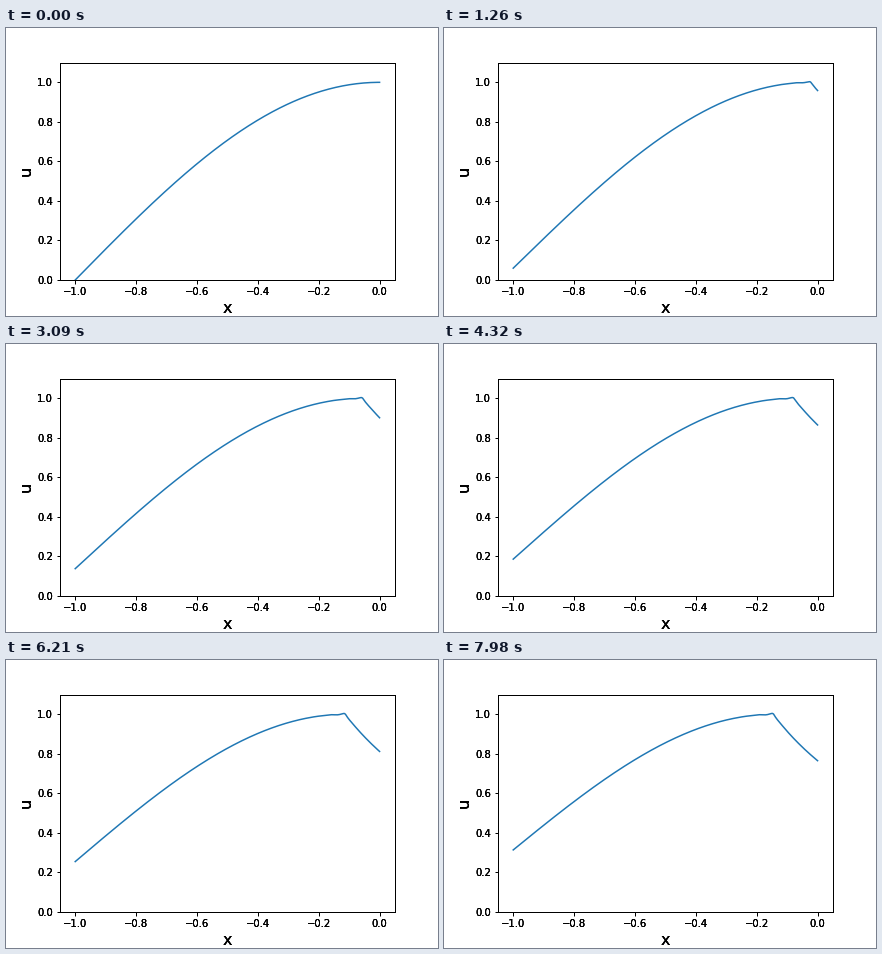
Animation, 432 px wide and 288 px high, one loop 8000 ms. Source, as a matplotlib script:

```python
import matplotlib.pyplot as plt
import numpy as np
from matplotlib.animation import FuncAnimation
from matplotlib.transforms import IdentityTransform

LOOP = 8000      # ms
STEP = 30        # ms per simulation step
FRAMES = 267
SPEED = 0.0317   # wave speed at u = 0, per second
DECAY = 0.0335   # decay rate of the inflow value at x = 0

plt.rcParams["font.family"] = "DejaVu Sans"
x = np.linspace(-1, 0, 305)


def speed(u):
    return SPEED * (1 + u) ** -0.8


def initial_wave(t):
    """cos(pi x / 2) carried left along its characteristics."""
    u = np.cos(np.pi * x / 2)
    for _ in range(25):
        s = np.minimum(x + 1 + speed(u) * t, 1)
        u = np.sin(np.pi / 2 * s)
    return u


def inflow_wave(t):
    """exp(-DECAY t), entering at x = 0 and moving left."""
    u = np.ones_like(x)
    for _ in range(25):
        u = np.minimum(np.exp(-DECAY * (t + x / speed(u))), 2)
    return u


def profile(t):
    if t == 0:
        return np.cos(np.pi * x / 2)
    grow = 1 - np.exp(-t / 0.4)
    a, b = initial_wave(t), inflow_wave(t)
    soft = 0.0025 * grow
    low = np.minimum(a, b)
    u = low - soft * np.log1p(np.exp(-np.abs(a - b) / soft))

    # small dispersive ripple around the front
    d = x + speed(1) * t
    fade = np.where(d < 0, np.exp(d / 0.025), np.exp(-d / 0.008))
    ripple = fade * np.cos(2 * np.pi * (d + 0.005) / 0.047)
    return u + (0.004 + 0.0002 * t) * grow * ripple


fig, ax = plt.subplots(figsize=(6, 4), dpi=72)
fig.subplots_adjust(left=0.125, right=0.9, bottom=0.125, top=0.88)
ax.set(xlim=(-1.05, 0.05), ylim=(0, 1.1),
       xticks=np.linspace(-1, 0, 6), yticks=np.linspace(0, 1, 6))
ax.set_xlabel("x", fontsize=16)
ax.set_ylabel("u", fontsize=16)
ax.tick_params(width=1)
for spine in ax.spines.values():
    spine.set_linewidth(1)
line, = ax.plot(x, profile(0), color="#1f77b4", lw=1.5)


def darken(label, passes=2):
    """Overprint a label so its antialiased edges get heavier."""
    px, py = label.get_transform().transform(label.get_position())
    for _ in range(passes):
        fig.text(px, py, label.get_text(), transform=IdentityTransform(),
                 size=label.get_size(), ha=label.get_ha(), va=label.get_va(),
                 rotation=label.get_rotation(),
                 rotation_mode=label.get_rotation_mode())


fig.canvas.draw()
for label in (*ax.get_xticklabels(), *ax.get_yticklabels(),
              ax.xaxis.label, ax.yaxis.label):
    darken(label)


def update(i):
    line.set_ydata(profile(i * STEP / 1000))
    return line,


anim = FuncAnimation(fig, update, frames=FRAMES, interval=LOOP / FRAMES,
                     repeat=True, repeat_delay=0, blit=False)
plt.show()
```
